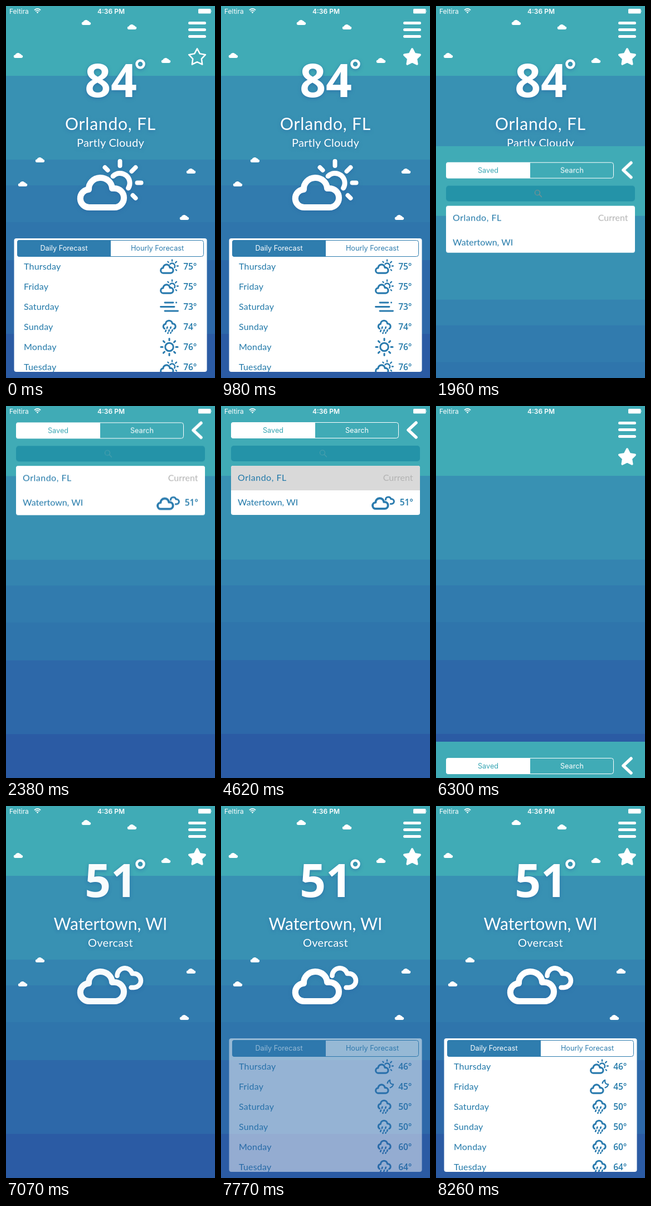
Recreate the animation shown at these times as an HTML page. Size 375 px wide and 666 px high, loop 9380 ms.

```html
<!DOCTYPE html>
<html lang="en">
<head>
<meta charset="utf-8">
<title>Weather</title>
<style>
  html, body { margin: 0; width: 100%; height: 100%; overflow: hidden; background: #2b5ba4; }
  svg { display: block; width: 100vw; height: 100vh; }
  text { font-family: Lato, "Open Sans", sans-serif; font-size: 16px; }
  .ui { font-family: Inter, Roboto, sans-serif; font-size: 12.7px; }
  .mid { text-anchor: middle; }
  .end { text-anchor: end; }
  .line { fill: none; stroke: currentColor; stroke-linecap: round; stroke-linejoin: round; }
  .white { color: #fff; fill: #fff; }
  .blue { color: #2a7bae; fill: #2279a9; }
  .info { filter: drop-shadow(0 2px 3px rgba(38, 105, 165, .65)); }
  .temp, .deg { font-family: "Open Sans", "Noto Sans", sans-serif; font-weight: 600; }
  .temp { font-size: 82px; font-weight: 700; }
  .deg { font-size: 15.5px; }
  .city { font-size: 30px; }
  .sky { font-size: 20px; letter-spacing: .25px; }

  .anim { animation: 9380ms linear infinite; }
  .first { animation-name: first; animation-timing-function: step-end; }
  .second { animation-name: second; }
  .days.second { animation-name: days; }
  .hollow { animation-name: hollow; animation-timing-function: step-end; }
  .solid { animation-name: solid; }
  .menu { animation-name: menu; }
  .panel { animation-name: panel; }
  .rows { animation-name: rows; }
  .press { animation-name: press; }
  .late { animation-name: late; animation-timing-function: step-end; }
  .lens { animation-name: lens; animation-timing-function: step-end; }

  @keyframes first { 0% { opacity: 1 } 25.6%, 100% { opacity: 0 } }
  @keyframes second {
    0%, 71.64% { opacity: 0; animation-timing-function: cubic-bezier(.2, .6, .3, 1) }
    76.87%, 100% { opacity: 1 }
  }
  @keyframes days {
    0%, 77.61% { opacity: 0; animation-timing-function: ease-in-out }
    88.06%, 100% { opacity: 1 }
  }
  @keyframes hollow { 0% { opacity: 1 } 6.716% { opacity: .35 } 8.209%, 100% { opacity: 0 } }
  @keyframes solid { 0%, 8.2% { opacity: 0 } 8.209% { opacity: .35 } 10.44%, 100% { opacity: 1 } }
  @keyframes menu { 0%, 17.9% { opacity: 1 } 17.91%, 18.65% { opacity: .4 } 19.4%, 100% { opacity: 1 } }
  /* critically damped spring, up and back down */
  @keyframes panel {
    0%, 19.49% {
      transform: translateY(666px);
      animation-timing-function: linear(0, .09, .264, .442, .594, .713, .801, .864, .908, .939, .96, .973, .983, .989, .993, .995, .997, .998, 1);
    }
    25.49% { transform: none }
    64.55% {
      transform: none;
      animation-timing-function: linear(0, .09, .264, .442, .594, .713, .801, .864, .908, .939, .96, .973, .983, .989, .993, .995, .997, .998, 1);
    }
    70.55%, 100% { transform: translateY(666px) }
  }
  @keyframes rows {
    0%, 51.5% { transform: none }
    53.73% { transform: translateY(30px) }
    55.22% {
      transform: translateY(30px);
      animation-timing-function: linear(0, .09, .264, .442, .594, .713, .801, .864, .908, .939, .96, .973, .983, .989, .993, .995, .997, .998, 1);
    }
    66.74%, 100% { transform: none }
  }
  @keyframes press { 0%, 49.24% { opacity: 0 } 49.25%, 51.5% { opacity: 1 } 53.73%, 100% { opacity: 0 } }
  @keyframes late { 0% { opacity: 0 } 23.88%, 100% { opacity: 1 } }
  @keyframes lens { 0% { color: #85908f } 23.88%, 100% { color: #4a9fad } }
</style>
</head>
<body>
<svg id="stage" viewBox="0 0 375 666" preserveAspectRatio="none">
  <defs>
    <clipPath id="dayClip"><rect x="14.5" y="416" width="346" height="239" rx="4"/></clipPath>
    <clipPath id="listClip"><rect x="18" y="107" width="339" height="88" rx="4"/></clipPath>
    <path id="cloud" class="line" stroke-width="11" d="M22.500 56.500H67a17 17 0 0 0 0-34H63a21 20 0 0 0-42 2a16 16 0 0 0 1.500 32z"/>
    <g id="partly"><g transform="translate(-59.5 -46)">
      <use href="#cloud" y="30"/>
      <path class="line" stroke-width="9" d="M64.600 30.600A17.500 17.500 0 0 1 92 52"/>
      <path class="line" stroke-width="8" d="M77 4v8M50 15l5 5M98 22l7-7M108 42.500h7M100 65l5 5"/>
    </g></g>
    <g id="overcast"><g transform="translate(-59.5 -35)">
      <use href="#cloud" y="8"/>
      <path class="line" stroke-width="8.500" d="M72 19a13.800 13.800 0 0 1 27-4h3a12.400 12.400 0 0 1 0 25h-5"/>
    </g></g>
    <g id="moon"><g transform="translate(-59.5 -46)">
      <use href="#cloud" y="30"/>
      <path class="line" stroke-width="8" d="M79 24Q82 10 95 5Q92 31 116 32Q111 48 97 52"/>
    </g></g>
    <g id="rain"><g class="line" transform="translate(-44 -43)">
      <path stroke-width="10.500" d="M14 54a16 16 0 0 1 7-29.500a21 20 0 0 1 42-2h4a17 17 0 0 1 7 32"/>
      <path stroke-width="9" d="M32 44l-3 8M54 44l-3 8M23 64l-3 8M44 62l-3 8M64 62l-3 8M36 80l-1 3M54 78l-2 4"/>
    </g></g>
    <path id="wind" class="line" stroke-width="2.9" d="M-8-7.500H7M12.500-7.500h.1M-15.500 0H9M-8 7.500H15.500"/>
    <g id="sun" class="line" stroke-width="3"><circle r="7.3"/><g id="rays"></g></g>
    <path id="puff" d="M-5.500 5a2.700 2.700 0 0 1 0-5.400A5 4.600 0 0 1 3-2.500A3.500 3.500 0 0 1 5.800-.2A2.600 2.600 0 0 1 5.500 5z"/>
  </defs>
</svg>
<script>
  const bandColors = { 0: '#40abb6', 125: '#3891b3', 275: '#3484b0', 321: '#317bae', 387: '#2f75ac', 455: '#2d68a9', 587: '#2b5ba4' };
  const bands = Object.entries(bandColors)
    .map(([y, c]) => `<rect y="${y}" width="375" height="${666 - y}" fill="${c}"/>`).join('');

  const text = (s, x, y, cls = '', extra = '') => `<text x="${x}" y="${y}" class="${cls}" ${extra}>${s}</text>`;
  const icon = (name, x, y, size = 1) => `<use href="#${name}" transform="translate(${x} ${y}) scale(${size})"/>`;
  const spaced = n => `letter-spacing="${n}"`;

  const puffs = [[144, 29], [226, 37], [22, 88], [287, 97], [61, 275], [332, 295], [30, 318], [320, 378]]
    .map(([x, y]) => icon('puff', x, y)).join('');

  const scene = (cls, p) => `<g class="anim ${cls} white">${puffs}<g class="info">
    ${text(p.temp, 188, 163, 'temp mid')}
    <circle cx="241" cy="104" r="6.5" fill="none" stroke="#fff" stroke-width="4.5"/>
    ${text(p.city, 187.5, 221.5, 'city mid', spaced(p.gap))}
    ${text(p.sky, 187.5, 252, 'sky mid')}
    ${icon(p.icon, 187, 320)}</g></g>`;

  const tabs = (x, y, w, h, cut, on, off, labels) => `
    <path d="M${cut} ${y}H${x + 4}a4 4 0 0 0-4 4V${y + h - 4}a4 4 0 0 0 4 4H${cut}z" fill="${on}"/>
    <rect x="${x + .5}" y="${y + .5}" width="${w - 1}" height="${h - 1}" rx="4" fill="none" stroke="${on}"/>
    ${text(labels[0], (x + cut) / 2, y + 19, 'ui mid', `fill="${off}"`)}
    ${text(labels[1], (x + w + cut) / 2, y + 19, 'ui mid', `fill="${on}"`)}`;

  const dayNames = ['Thursday', 'Friday', 'Saturday', 'Sunday', 'Monday', 'Tuesday'];
  const sizes = { partly: .286, moon: .286, rain: .286 };
  const days = (cls, p) => `<g class="anim days ${cls}" clip-path="url(#dayClip)">
    <rect x="14" y="416" width="347" height="239" fill="#fff"/>
    ${tabs(20, 419, 335, 30, 188, '#2f7dae', '#fff', ['Daily Forecast', 'Hourly Forecast'])}
    <g class="blue">${dayNames.map((day, i) => {
      const y = 466.5 + 36 * i, [name, t] = p.days[i];
      return text(day, 32, y + 5.5, '', spaced(.2)) + icon(name, 293, y, sizes[name])
        + text(t + '°', 342.5, y + 5.5, 'deg end');
    }).join('')}</g></g>`;

  const orlando = {
    temp: 84, city: 'Orlando, FL', gap: .8, sky: 'Partly Cloudy', icon: 'partly',
    days: [['partly', 75], ['partly', 75], ['wind', 73], ['rain', 74], ['sun', 76], ['partly', 76]]
  };
  const watertown = {
    temp: 51, city: 'Watertown, WI', gap: .1, sky: 'Overcast', icon: 'overcast',
    days: [['partly', 46], ['moon', 45], ['rain', 50], ['rain', 50], ['rain', 60], ['rain', 64]]
  };

  const star = (outer, inner) => Array.from({ length: 10 }, (_, i) => {
    const a = i * Math.PI / 5, r = i % 2 ? inner : outer;
    return `${(343 + r * Math.sin(a)).toFixed(2)},${(92 - r * Math.cos(a)).toFixed(2)}`;
  }).join(' ');

  const buttons = `<g class="white">
    <path class="line anim menu" stroke-width="5" d="M329.500 30.500H356.500M329.500 42.500H356.500M329.500 54.500H356.500"/>
    <polygon class="line anim hollow" stroke-width="2.5" points="${star(15.6, 8.2)}"/>
    <polygon class="anim solid" stroke="#fff" stroke-width="4" stroke-linejoin="round" points="${star(14.6, 7.4)}"/></g>`;

  const panel = `<g class="anim panel">${bands}
    ${tabs(18, 29, 301, 29, 169, '#fff', '#36a5b3', ['Saved', 'Search'])}
    <path class="line white" stroke-width="5.5" style="fill:none" d="M350 30L336 43L350 56"/>
    <rect x="18" y="71" width="339" height="28" rx="5" fill="#2493a8"/>
    <path class="line anim lens" stroke-width="1.2" d="M186.500 83.500a4.500 4.500 0 1 0-9 0a4.500 4.500 0 1 0 9 0M185.500 87l4 4"/>
    <rect x="18" y="107" width="339" height="84" rx="4" fill="#fff"/>
    <rect class="anim late" x="18" y="107" width="339" height="88" rx="4" fill="#fff"/>
    <g clip-path="url(#listClip)"><g class="anim rows blue">
      <rect class="anim press" x="18" y="107" width="339" height="44" fill="#d9d9d9"/>
      ${text('Orlando, FL', 30, 134, '', spaced(.5))}
      ${text('Current', 344.5, 134, 'end', 'fill="#b3b3b3"')}
      ${text('Watertown, WI', 30, 178)}
      <g class="anim late">${icon('overcast', 291, 173.5, .353)}${text('51°', 345, 178, 'deg end')}</g>
    </g></g></g>`;

  const status = `<g class="white">
    ${text('Feltira', 6, 13.5, 'ui', 'style="font-size:12px"')}
    ${text('4:36 PM', 188.5, 13.5, 'ui mid', 'style="font-size:12px;font-weight:600"')}
    <path class="line" stroke-width="1.7" style="fill:none;stroke-linecap:butt" d="M51 7.300a7.500 7.500 0 0 1 11 0M53 9.500a4.800 4.800 0 0 1 7 0"/>
    <path d="M54.700 11.200a2.500 2.500 0 0 1 3.600 0L56.500 13.200z"/>
    <rect x="345" y="5" width="22.5" height="8.5" rx="1.5"/>
    <path d="M368.200 7.500q1.400 1.700 0 3.500z"/></g>`;

  document.getElementById('rays').innerHTML = Array.from({ length: 8 },
    (_, i) => `<path d="M0-12v-3" transform="rotate(${i * 45})"/>`).join('');

  document.getElementById('stage').insertAdjacentHTML('beforeend',
    bands + scene('first', orlando) + scene('second', watertown)
    + days('first', orlando) + days('second', watertown) + buttons + panel + status);
</script>
</body>
</html>
```
